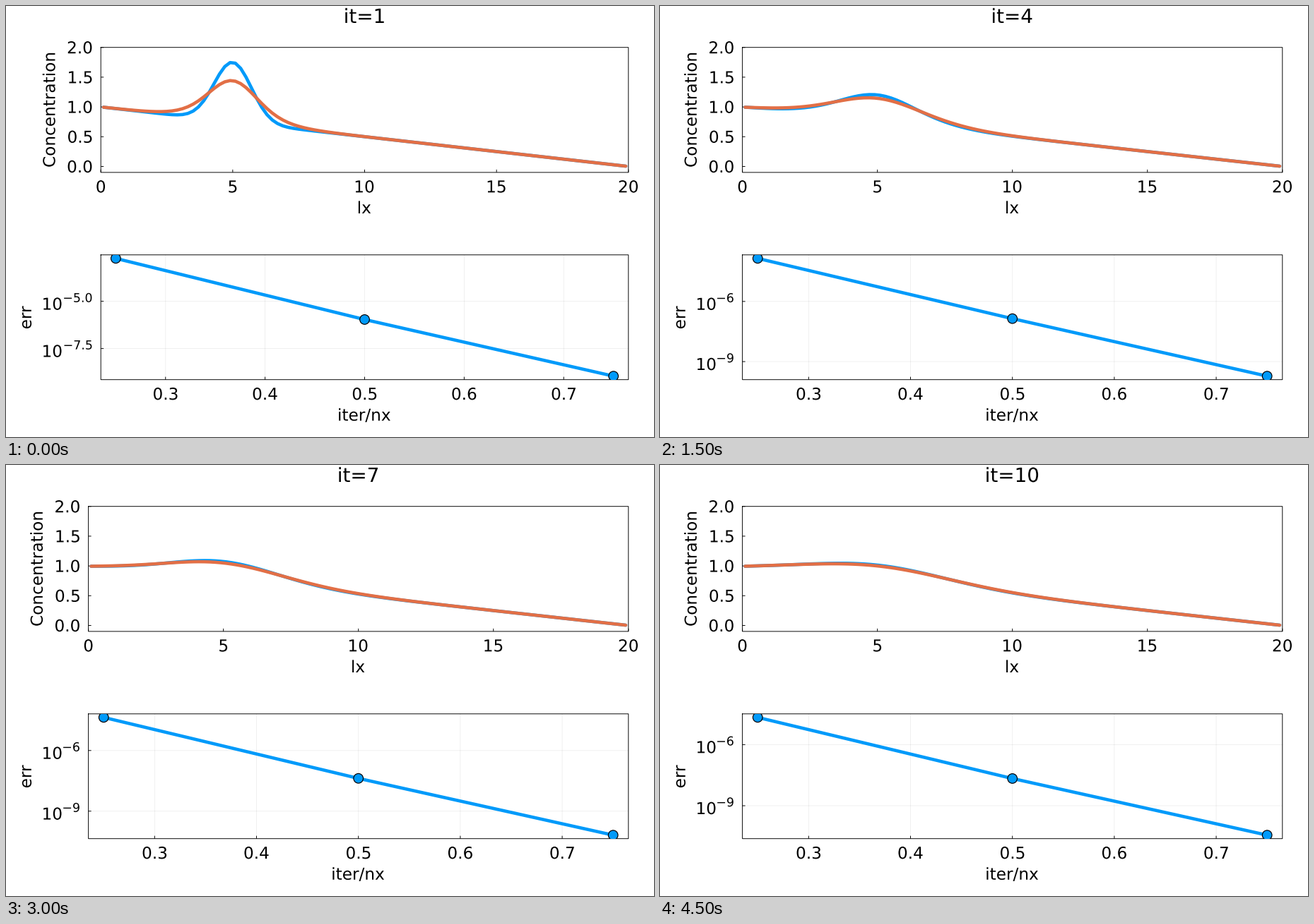
A matplotlib script for the animation above (5 s loop, 917 by 611 pixels).

```python
import numpy as np
import matplotlib.pyplot as plt
from matplotlib.animation import FuncAnimation
from matplotlib.patches import Circle, PathPatch, Rectangle
from matplotlib.textpath import TextPath
from matplotlib.transforms import Affine2D

W, H, DPI = 917, 611, 64
PT = 72 / DPI                      # points per pixel
BLUE, ORANGE = "#009afa", "#e26f46"
RIGHT = 880.8
TOP_BOX = (58.7, 235.9)            # upper and lower edge of each panel
LOW_BOX = (352.8, 529.7)
FONT, SUP, TITLE = 23.2, 17.4, 27.8
STEPS = 10

# implicit diffusion of a Gaussian bump on a linear slope, fixed ends
LX, NX, DT = 20.0, 100, 0.4
DX = LX / NX
xc = np.linspace(DX / 2, LX - DX / 2, NX)


def diffuse():
    r = DT / DX**2
    A = np.eye(NX)
    for i in range(1, NX - 1):
        A[i, i - 1:i + 2] = -r, 1 + 2 * r, -r
    states = [1 + np.exp(-(xc - LX / 4) ** 2) - xc / LX]
    for _ in range(STEPS):
        states.append(np.linalg.solve(A, states[-1]))
    return states


conc = diffuse()

# log10 of the residual at the three checks, interpolated over log(step)
KEYS = np.log([1, 2, 3, 5, 7, 9, 10])
LOG_ERR = [
    (-2.728, -3.239, -3.575, -4.068, -4.361, -4.571, -4.664),
    (-5.963, -6.239, -6.582, -7.071, -7.378, -7.581, -7.664),
    (-8.959, -9.204, -9.504, -9.896, -10.186, -10.376, -10.443),
]
CHECKS = np.array([0.25, 0.5, 0.75])

fig = plt.figure(figsize=(W / DPI, H / DPI), dpi=DPI, facecolor="white")
ax = fig.add_axes([0, 0, 1, 1])


def scale(lo, hi, a, b):
    return lambda v: a + (np.asarray(v) - lo) / (hi - lo) * (b - a)


def line(x, y, color="black", width=0.95, **kw):
    return ax.plot(x, y, color=color, lw=width * PT, snap=False, **kw)[0]


def text(s, x, y, size=FONT, align="center", vertical=False):
    """Draw s with its baseline at y (or at x when vertical)."""
    path = TextPath((0, 0), s, size=size, prop={"family": "DejaVu Sans"})
    box = path.get_extents()
    shift = {"center": (box.x0 + box.x1) / 2, "right": box.x1, "origin": 0}[align]
    tr = Affine2D().translate(-shift, 0).scale(1, -1)
    if vertical:
        tr.rotate_deg(-90)
    tr.translate(x, y)
    ax.add_patch(PathPatch(tr.transform_path(path), fc="black", lw=0, snap=False))


def panel(left, box, px, xticks, xname):
    top, bottom = box
    line([left, RIGHT, RIGHT, left, left], [top, top, bottom, bottom, top],
         solid_joinstyle="miter", zorder=2)
    for value, label in xticks:
        x = px(value)
        line([x, x], [bottom, bottom - 4], solid_capstyle="butt", zorder=2)
        text(label, x, bottom + 28.4)
    text(xname, (left + RIGHT) / 2, bottom + 58.1)


def ytick(left, y):
    line([left, left + 4], [y, y], solid_capstyle="butt", zorder=2)


def clip(artist, left, box):
    artist.set_clip_path(Rectangle((left, box[0]), RIGHT - left, box[1] - box[0],
                                   transform=ax.transData))


def curve(x, y, color, left, box, z=3):
    clip(line(x, y, color, 4.6, solid_capstyle="round",
              solid_joinstyle="round", zorder=z), left, box)


def draw_concentration(it, left):
    px = scale(0, LX, left, RIGHT)
    py = scale(-0.1, 2.0, TOP_BOX[1], TOP_BOX[0])
    panel(left, TOP_BOX, px, [(v, str(v)) for v in range(0, 21, 5)], "lx")
    for v in np.arange(0, 2.1, 0.5):
        ytick(left, py(v))
        text(f"{v:.1f}", left - 12.8, py(v) + 8.5, align="right")
    text("Concentration", left - 64.8, sum(TOP_BOX) / 2, vertical=True)
    curve(px(xc), py(conc[it - 1]), BLUE, left, TOP_BOX)
    curve(px(xc), py(conc[it]), ORANGE, left, TOP_BOX, 4)


def draw_error(it, left):
    err = np.array([np.interp(np.log(it), KEYS, row) for row in LOG_ERR])
    padx, pady = 0.03 * 0.5, 0.03 * (err[0] - err[2])
    px = scale(0.25 - padx, 0.75 + padx, left, RIGHT)
    py = scale(err[2] - pady, err[0] + pady, LOW_BOX[1], LOW_BOX[0])
    xticks = [(v, f"{v:.1f}") for v in np.arange(3, 8) / 10]
    powers = [(-5, "5.0"), (-7.5, "7.5")] if it == 1 else [(-6, "6"), (-9, "9")]

    grid = dict(color="black", width=0.8, alpha=0.075, zorder=1)
    for v, _ in xticks:
        line([px(v)] * 2, LOW_BOX, **grid)
    for v, label in powers:
        y = py(v)
        line([left, RIGHT], [y, y], **grid)
        ytick(left, y)
        text("10", 50.5, y + 11.9, align="origin")
        text("\u2212" + label, left - 12.8, y + 1.1, SUP, align="right")
    panel(left, LOW_BOX, px, xticks, "iter/nx")
    text("err", 35.8, sum(LOW_BOX) / 2, vertical=True)

    xs, ys = px(CHECKS), py(err)
    curve(xs, ys, BLUE, left, LOW_BOX)
    for x, y in zip(xs, ys):
        dot = Circle((x, y), 6.8, fc=BLUE, ec="black", lw=1.2 * PT, zorder=5)
        ax.add_patch(dot)
        clip(dot, left, LOW_BOX)


def draw(i):
    it = i + 1
    left = 134.2 if it == 1 else 116.6
    ax.clear()
    ax.set_xlim(0, W)
    ax.set_ylim(H, 0)
    ax.axis("off")
    text(f"it={it}", (left + RIGHT) / 2, 24, TITLE)
    draw_concentration(it, left)
    draw_error(it, left)
    return []


anim = FuncAnimation(fig, draw, frames=STEPS, interval=500, repeat=True,
                     init_func=lambda: [])
plt.show()
```
